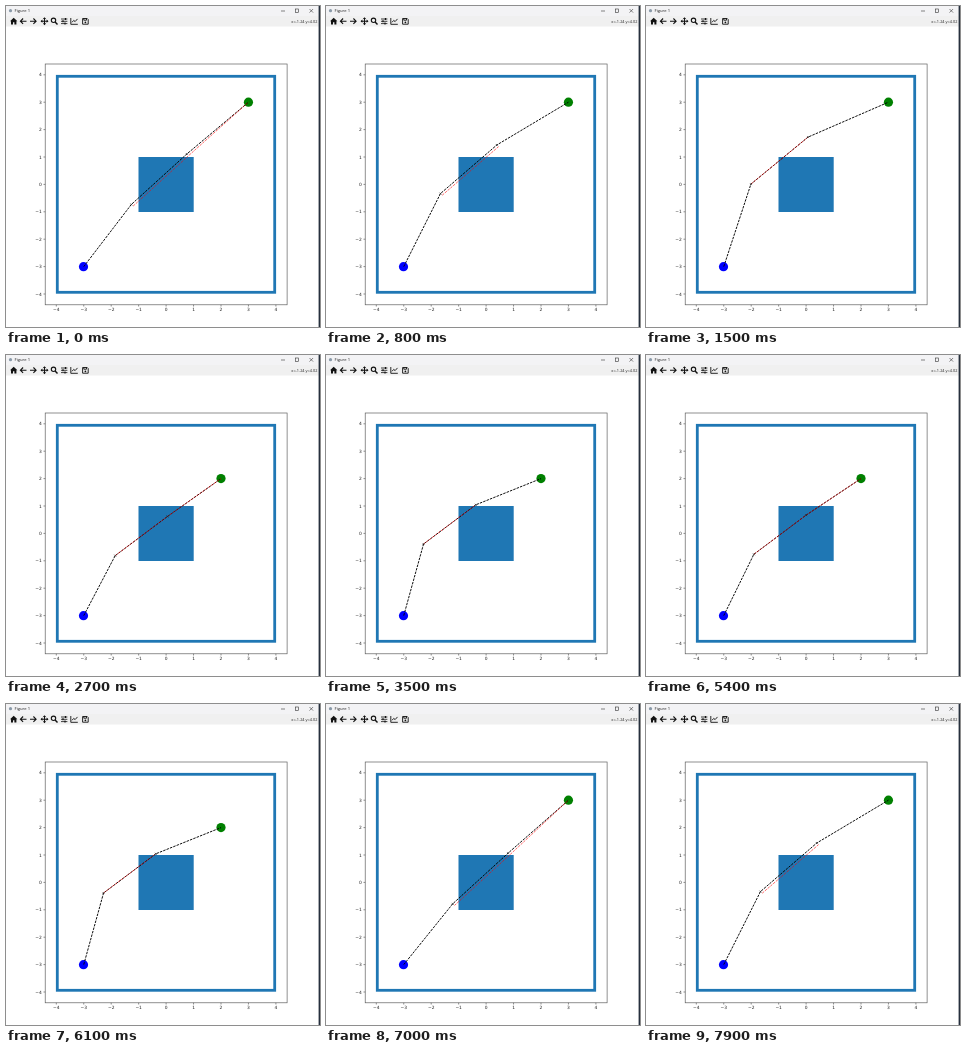
Animation, 314 px wide and 321 px high, one loop 8000 ms. Source, as an HTML page:

```html
<!DOCTYPE html>
<html lang="en">
<head>
<meta charset="utf-8">
<title>Path relaxation</title>
<style>
  html, body { margin: 0; width: 100%; height: 100%; overflow: hidden; background: #fff; }
  svg { display: block; width: 314px; height: 321px; }
  .ui { font: 4.2px "Open Sans", "Noto Sans", sans-serif; fill: #222; }
  .tick { font: 4.4px "DejaVu Sans", sans-serif; fill: #222; }
  .icon { fill: none; stroke: #111; stroke-width: 1.1; }
  .solid { fill: #111; stroke: none; }
  .path, .hit { fill: none; stroke-dasharray: 2.5 1.1; }
  .path { stroke: #000; stroke-width: .95; }
  .hit { stroke: #f00; stroke-width: .75; stroke-opacity: .8; }
  .mark { fill: none; stroke: #222; stroke-width: .6; }
</style>
</head>
<body>
<svg viewBox="0 0 314 321">
  <rect width="314" height="10" fill="#f3f3f5"/>
  <rect y="10" width="314" height="10.5" fill="#f0f0f0"/>
  <circle cx="4.5" cy="4.7" r="1.6" fill="#8a9aa8"/>
  <text class="ui" x="8.5" y="6.3">Figure 1</text>
  <g fill="none" stroke="#333" stroke-width=".6">
    <path d="M275 5h4M303.5 3l3.6 3.6m0-3.6l-3.6 3.6"/>
    <rect x="289.3" y="3" width="3.4" height="3.4"/>
  </g>
  <g class="icon">
    <path class="solid" d="M4 15.2l3.7-3.5 3.7 3.5h-1v3.3h-2v-2.2h-1.4v2.2H5v-3.3z"/>
    <path d="M20.5 15.2h-6m2.6-2.7l-2.7 2.7 2.7 2.7M24 15.2h6m-2.6-2.7l2.7 2.7-2.7 2.7"/>
    <path d="M35.3 15.2h6.4M38.5 12v6.4"/>
    <path class="solid" d="M38.5 11.2l1.6 1.9h-3.2zM38.5 19.2l1.6-1.9h-3.2zM34.5 15.2l1.9-1.6v3.2zM42.5 15.2l-1.9-1.6v3.2z"/>
    <circle cx="47.5" cy="14.3" r="2.2"/>
    <path d="M49.1 15.9l2.4 2.5" stroke-width="1.4"/>
    <path d="M55 13h6.4M55 15.3h6.4M55 17.6h6.4" stroke-width=".8"/>
    <path d="M59.5 12v2M57 14.3v2M59 16.6v2" stroke-width="1.2"/>
    <path d="M64.8 12v6.3h7M66 16.3l1.7-1.9 1.4 1.2 2.4-2.7" stroke-width=".9"/>
    <path d="M76.6 12.5h4.6l1 1v4.7h-5.6zM77.8 12.5v1.7h2.7v-1.7" stroke-width=".9"/>
    <circle class="solid" cx="79.4" cy="16.3" r=".9"/>
  </g>
  <text class="ui" x="311.5" y="16.6" text-anchor="end" style="font-size:3.9px">x=-1.24 y=4.02</text>
  <rect x="312.6" width="1.4" height="321" fill="#26303d"/>

  <rect x="51.3" y="70.3" width="217.4" height="216" fill="none" stroke="#1f77b4" stroke-width="2.8"/>
  <rect x="132.5" y="151" width="55.2" height="55" fill="#1f77b4"/>
  <rect x="39.2" y="58" width="241.9" height="240.8" fill="none" stroke="#555" stroke-width=".65"/>
  <g id="ticks"></g>

  <circle cx="77.5" cy="260.7" r="4.6" fill="#00f"/>
  <circle id="goal" r="4.6" fill="#008000"/>
  <path id="route" class="path"/>
  <path id="hit" class="hit"/>
  <path id="marks" class="mark"/>
</svg>
<script>
const LOOP = 8000, STEP = 100;
const $ = id => document.getElementById(id);
const px = x => 160.1 + 27.45 * x;
const py = y => 178.4 - 27.4 * y;

// Each run relaxes a straight path until it clears the square.
const runs = [
  { start: -200, goal: 3 },
  { start: 1700, goal: 2 },
  { start: 4300, goal: 2 },
  { start: 6900, goal: 3 }
];

// Age is in steps; the shift is in pixels along the up-left diagonal.
const kinds = {
  3: {
    clear: 30, tailFree: 9, lag: 24,
    shift: a => 4.6 + 1.36 * a,
    second: d => [0.92 * d, Math.max(0, 0.83 * d - 3.1)]
  },
  2: {
    clear: 32.5, tailFree: 25, lag: 0,
    shift: a => 2.8 + 0.98 * a + 0.017 * a * a,
    second: d => { const e = Math.max(0, d - 6.5); return [e, e]; }
  }
};

function drawTicks() {
  let out = "";
  for (let v = -4; v <= 4; v++) {
    const label = String(v).replace("-", "\u2212");
    const x = px(v), y = py(v);
    out += `<path d="M${x} 298.8v1.7M39.2 ${y}h-1.7" stroke="#444" stroke-width=".6"/>
      <text class="tick" x="${x}" y="305.3" text-anchor="middle">${label}</text>
      <text class="tick" x="35.8" y="${y + 1.6}" text-anchor="end">${label}</text>`;
  }
  $("ticks").innerHTML = out;
}

const line = points => "M" + points.map(p => p.join(" ")).join("L");
const cross = ([x, y]) => `M${x - 1} ${y - 1}l2 2m0-2l-2 2`;

function draw(time) {
  const t = Math.floor(time / STEP) * STEP;
  const run = runs.filter(r => r.start <= t).pop();
  const g = run.goal, kind = kinds[g];
  const d = Math.min(kind.clear, kind.shift((t - run.start) / STEP));
  const [ex, ey] = kind.second(d);
  const third = (g + 3) / 3;
  const end = [px(g), py(g)];
  const a = [px(third - 3) - d, py(third - 3) - d];
  const b = [px(2 * third - 3) - ex, py(2 * third - 3) - ey];

  $("goal").setAttribute("cx", end[0]);
  $("goal").setAttribute("cy", end[1]);
  $("route").setAttribute("d", line([[px(-3), py(-3)], a, b, end]));
  $("marks").setAttribute("d", cross(a) + cross(b));

  // Colliding segments are red, early on one update behind the path.
  const late = ([x, y]) => d < kind.lag ? [x + 1.8, y + 1.6] : [x, y];
  const red = [late(a), late(b)];
  if (d < kind.tailFree) red.push(end);
  $("hit").setAttribute("d", d < kind.clear ? line(red) : "");
}

drawTicks();
draw(0);
const began = performance.now();
function tick() {
  draw((performance.now() - began) % LOOP);
  requestAnimationFrame(tick);
}
requestAnimationFrame(tick);
</script>
</body>
</html>
```
